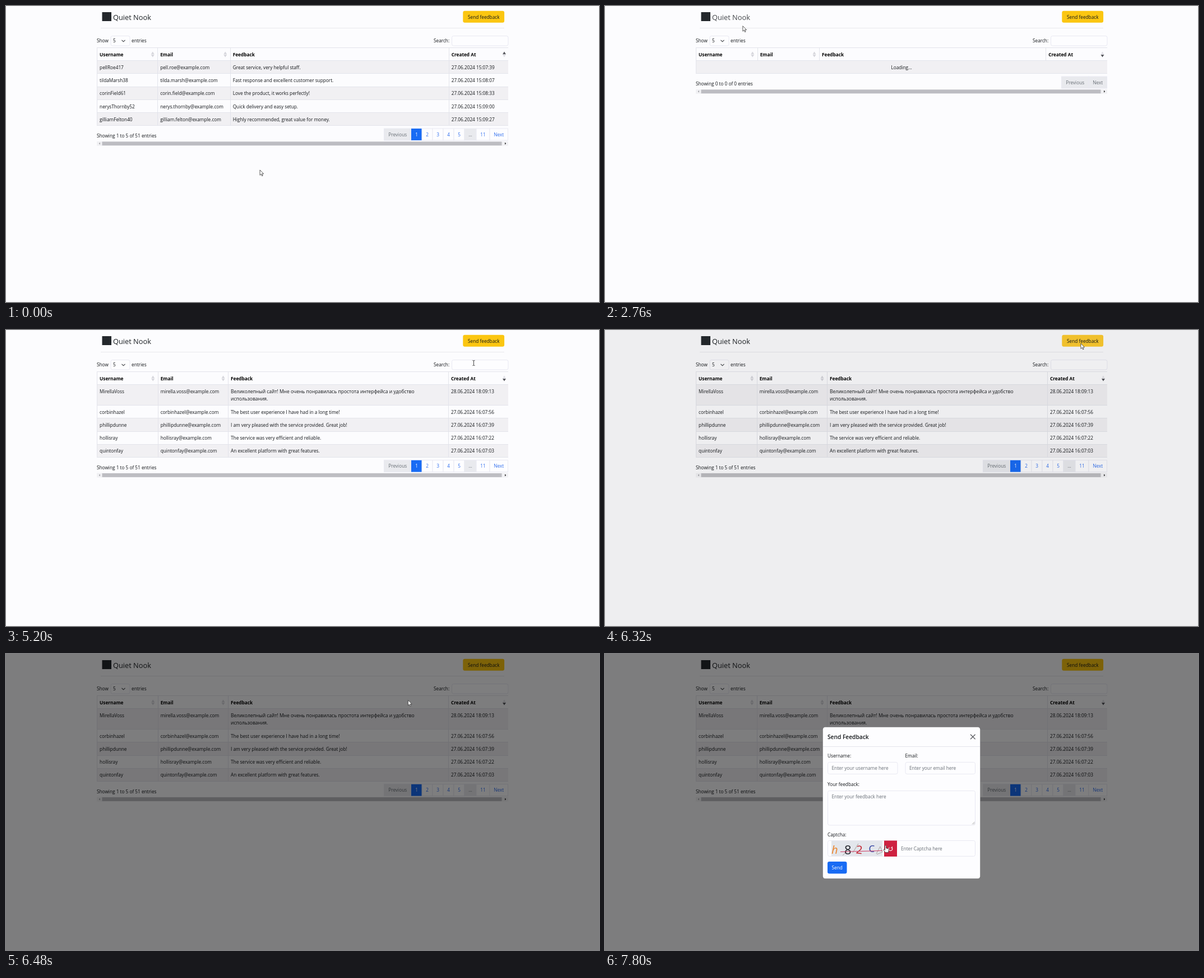
These frames come from a looping animation (1058x529 px, 8 s). An HTML page:

```html
<!DOCTYPE html>
<html lang="en">
<head>
<meta charset="utf-8">
<title>Feedback page</title>
<style>
html, body { margin: 0; width: 100%; height: 100%; overflow: hidden; background: #fcfcfe; }
svg { display: block; width: 1058px; height: 529px; }
text { font: 8.25px "Open Sans", "Noto Sans", sans-serif; fill: #14171a; }
.b { font-weight: 700; fill: #000; }
.ru { font-size: 8.5px; }
.muted { fill: #686e75; }
.link { fill: #2f6eee; }
.white { fill: #fff; }
.brand { font-size: 12.8px; }
.title { font-size: 10.2px; font-weight: 600; }
.status { font-size: 6.5px; }
.pop { font: 8px Roboto, sans-serif; }
.small { font: 7.5px Roboto, sans-serif; }
.cap { font: 20px "Noto Sans", sans-serif; }
.mid { text-anchor: middle; }
</style>
</head>
<body>
<svg id="stage" viewBox="0 0 1058 529"></svg>
<script>
const LOOP = 8000, LINE = '#e3e4eb', EDGE = '#e9e9f2', GREY = '#e9eaee', BLUE = '#186bf4';

const text = (x, y, s, cls = '', extra = '') =>
  `<text x="${x}" y="${y}" class="${cls}" ${extra}>${s}</text>`;
const rect = (x, y, w, h, fill, stroke = 'none', r = 0, extra = '') =>
  `<rect x="${x}" y="${y}" width="${w}" height="${h}" rx="${r}" fill="${fill}" stroke="${stroke}" ${extra}/>`;
const path = (d, stroke = LINE, w = 1, fill = 'none', extra = '') =>
  `<path d="${d}" stroke="${stroke}" stroke-width="${w}" fill="${fill}" ${extra}/>`;
const group = (id, body) => `<g id="${id}">${body}</g>`;
const field = (x, y, w, h) => rect(x, y, w, h, '#fdfdff', EDGE, 3);

const sortIcon = (x, up, down) =>
  path(`M${x - 3} 86.2h6l-3-4.6z`, 'none', 0, up) + path(`M${x - 3} 87h6l-3 4.6z`, 'none', 0, down);

function pager(y, loaded) {
  const items = loaded
    ? [['Previous', 674.5, 723], ...[1, 2, 3, 4, 5].map((n, i) => [n, 723 + 19 * i, 742 + 19 * i]),
       ['...', 818, 839], ['11', 839, 863], ['Next', 863, 895.5]]
    : [['Previous', 814.5, 863], ['Next', 863, 895.5]];
  return items.map(([s, a, b]) => {
    const off = !loaded || s === 'Previous' || s === '...', on = s === 1;
    return rect(a, y + 5.2, b - a, 21, on ? BLUE : off ? GREY : '#fdfdff', on ? 'none' : EDGE) +
      text((a + b) / 2, y + 18.8, s, 'mid ' + (on ? 'white' : off ? 'muted' : 'link'));
  }).join('');
}

// cols: left edges of the four columns; rows: cell texts, a feedback array wraps
function table(id, cols, rows, descending, info) {
  const loaded = rows.length > 0, heads = ['Username', 'Email', 'Feedback', 'Created At'];
  let y = 97.6, fills = '', lines = 'M162 74.4H896M162 97.6H896', cells = '';
  (loaded ? rows : [[]]).forEach((row, i) => {
    const wraps = Array.isArray(row[2]), h = wraps ? 36.9 : 23.25;
    if (i % 2 === 0) fills += rect(162, y, 734, h, '#f1f0f3');
    row.forEach((cell, c) => [].concat(cell).forEach((s, k) => {
      cells += text(cols[c] + 4.7, y + 15.2 + 13.5 * k, s, Array.isArray(cell) ? 'ru' : '');
    }));
    y += h;
    lines += `M162 ${y}H896`;
  });
  if (!loaded) cells = text(529, 112.8, 'Loading...', 'mid');
  cols.forEach((x, i) => lines += `M${x} 74.4V${loaded || !i ? y : 97.6}`);
  const x = loaded ? 889 : 887.5;
  return group(id, fills + path(lines, LINE, 1, 'none', 'shape-rendering="crispEdges"') + cells +
    heads.map((s, i) => text(cols[i] + 4.7, 89.7, s, 'b')).join('') +
    [1, 2].map(i => sortIcon(cols[i] - 8.8, '#d6d6dc', '#d6d6dc')).join('') +
    sortIcon(x, descending ? '#e0e0e6' : '#55565c', descending ? '#55565c' : '#e0e0e6') +
    text(162, y + 21.6, info) + pager(y, loaded) +
    rect(162, y + 28, 734, 8, '#f1f1f4') + rect(171.5, y + 28.6, 713, 6.8, '#bdbdc2') +
    path(`M168 ${y + 30}v4l-2.4-2z`, 'none', 0, '#a5a5aa') +
    path(`M890 ${y + 30}v4l2.4-2z`, 'none', 0, '#333'));
}

const person = (user, mail, note, time) => [user, mail + '@example.com', note, time];

const oldest = [
  person('pellRoe417', 'pell.roe', 'Great service, very helpful staff.', '27.06.2024 15:07:39'),
  person('tildaMarsh38', 'tilda.marsh', 'Fast response and excellent customer support.', '27.06.2024 15:08:07'),
  person('corinField61', 'corin.field', 'Love the product, it works perfectly!', '27.06.2024 15:08:33'),
  person('nerysThornby52', 'nerys.thornby', 'Quick delivery and easy setup.', '27.06.2024 15:09:00'),
  person('gilliamFelton40', 'gilliam.felton', 'Highly recommended, great value for money.', '27.06.2024 15:09:27')
];
const newest = [
  person('MirellaVoss', 'mirella.voss',
    ['Великолепный сайт! Мне очень понравилась простота интерфейса и удобство', 'использования.'],
    '28.06.2024 18:09:13'),
  person('corbinhazel', 'corbinhazel', 'The best user experience I have had in a long time!', '27.06.2024 16:07:56'),
  person('phillipdunne', 'phillipdunne', 'I am very pleased with the service provided. Great job!', '27.06.2024 16:07:39'),
  person('hollisray', 'hollisray', 'The service was very efficient and reliable.', '27.06.2024 16:07:22'),
  person('quintonfay', 'quintonfay', 'An excellent platform with great features.', '27.06.2024 16:07:03')
];
const total = 'Showing 1 to 5 of 51 entries';

const header =
  rect(171.5, 11, 16.5, 16, '#24282c') + text(191, 24.6, 'Quiet Nook', 'brand', 'id="brand"') +
  rect(815.3, 8.8, 73.8, 21, '#fbc611', 'none', 3.3, 'id="send"') + text(852.3, 22.6, 'Send feedback', 'mid') +
  path('M169 39.5H889', '#e8e8ec') +
  text(162, 65.2, 'Show') + field(187, 53.5, 34, 17.5) + text(191, 65.2, '5') +
  path('M206.5 60.8l3 3 3-3', '#3a3d42', 1.1) + text(224, 65.2, 'entries') +
  text(763, 65.2, 'Search:') + field(795.5, 53.5, 100.5, 17.5);

const status = rect(-1, 519, 49, 11, '#eaebef', '#cfd0d6', 1) + text(3, 527.6, '127.0.0.1:8000', 'status');

const popup =
  rect(843, -10, 214, 67, '#fff', 'none', 7, 'style="filter:drop-shadow(0 2px 4px #0004)"') +
  '<circle cx="860" cy="10.5" r="8" fill="#e04cb4"/>' +
  text(877, 13, 'Перевести страницу на русский?', 'pop') +
  path('M1040.5 1.5l5.5 5.5m0-5.5l-5.5 5.5', '#888', .8) +
  rect(903.5, 32.5, 55.5, 15.5, '#ffd60c', 'none', 4) + text(931, 43, 'Перевести', 'small mid') +
  rect(963.5, 32.5, 52.5, 15.5, '#e5e5ea', 'none', 4) + text(989.7, 43, 'Не сейчас', 'small mid') +
  rect(1020.5, 32.5, 16, 15.5, '#e5e5ea', 'none', 4) +
  path('M1028.5 37v0m0 3.3v0m0 3.3v0', '#333', 1.5, 'none', 'stroke-linecap="round"');

const captcha =
  rect(404, 334, 91, 27, '#e3e6ec') +
  path('M424 360L431 353M442 355L452 339M484 357L491 344L495 354M485 358L495 354', '#9a8f86', .8) +
  text(404, 357, 'h', 'cap', 'style="fill:#ea8630;font-style:italic"') +
  text(427, 358, '8', 'cap', 'style="fill:#2b2c33;font-size:22px"') +
  text(448, 357, '2', 'cap', 'style="fill:#c42c38" transform="rotate(6 454 350)"') +
  text(470.5, 354, 'C', 'cap', 'style="fill:#3040a0;font-size:17px"') +
  path('M420 353.5L495 351.5', '#cf3a62', 1);

const modal =
  rect(388.5, 130.5, 281, 271, '#fdfdff', '#0003', 4.4) +
  text(397, 152, 'Send Feedback', 'title') + path('M652 143.7l8.6 8.6m0-8.6l-8.6 8.6', '#5c5d63', 1.3) +
  path('M389 165.5H669') +
  text(397, 185, 'Username:') + field(397.5, 193.5, 124.5, 21) + text(404.5, 207, 'Enter your username here', 'muted') +
  text(535.5, 185, 'Email:') + field(536, 193.5, 124.5, 21) + text(543, 207, 'Enter your email here', 'muted') +
  text(397, 236, 'Your feedback:') + field(397.5, 244.5, 263, 61.5) + text(404.5, 258, 'Enter your feedback here', 'muted') +
  path('M655 304.5l4.5-4.5m-2 4.5l2-2', '#888', .7) +
  text(397, 325.5, 'Captcha:') + field(397.5, 333.5, 263, 28) + captcha +
  rect(498, 333.5, 23, 28.5, '#dc3545', 'none', 0, 'id="reload"') +
  path('M511.8 345.9A3.3 3.3 0 1 1 507.5 345.6M509.8 346.5h2.4v-2.4', '#fff', 1.1) +
  text(528, 351.3, 'Enter Captcha here', 'muted') +
  rect(397, 371, 34.5, 21.5, BLUE, 'none', 3.3) + text(414.2, 385, 'Send', 'mid white');

const cursors =
  path('M0 0V9.4L2.2 7.4 3.7 10.8 5.2 10.2 3.7 6.9H6.7Z', '#333', .8, '#fff', 'id="arrow"') +
  path('M-1.1 1.2a1.1 1.1 0 0 1 2.2 0V5l3.7.9q1.2.4 1.1 1.6l-.8 5.2h-5.2L-3.6 8.6q-.3-1.2.7-1.4L-1.1 8.4Z',
    '#333', .8, '#fff', 'id="hand"') +
  path('M-2-4.6Q0-4.6 0-3.6 0-4.6 2-4.6M0-4V4M-2 4.6Q0 4.6 0 3.6 0 4.6 2 4.6', '#333', .9, 'none', 'id="beam"');

document.getElementById('stage').innerHTML =
  rect(0, 0, 1058, 529, '#fcfcfe') + header +
  table('first', [162.4, 270.5, 400, 790], oldest, false, total) +
  table('loading', [162.4, 272, 382.3, 786.5], [], true, 'Showing 0 to 0 of 0 entries') +
  table('second', [162.4, 271, 396.3, 789.3], newest, true, total) +
  group('status', status) + group('popup', popup) +
  rect(0, 0, 1058, 529, '#000', 'none', 0, 'id="shade"') +
  group('modal', modal) + group('cursor', cursors);

const el = id => document.getElementById(id);
const show = (id, on) => el(id).style.display = on ? '' : 'none';
const ramp = (t, from, span) => Math.min(1, Math.max(0, (t - from) / span));

// time, x, y of the pointer; a fourth value gives the segment's easing
const smooth = p => p * p * (3 - 2 * p), slow = p => 1 - (1 - p) ** 2, fast = p => p ** 1.5;
const route = [
  [20, 453, 293], [860, 214, 44], [1440, 199, 22], [2200, 199, 22], [2980, 257, 39], [3880, 257, 39],
  [4680, 988, 40], [4800, 988, 40], [5200, 834.5, 59], [5640, 849, 24], [6320, 849, 24],
  [6480, 718, 82, fast], [7240, 479, 299, slow], [7640, 500.5, 342], [8000, 500.5, 342]
];

function pointer(t) {
  const i = route.findIndex(k => k[0] > t);
  if (i <= 0) return route[0].slice(1);
  const [t0, x0, y0] = route[i - 1], [t1, x1, y1, ease = smooth] = route[i];
  const p = ease((t - t0) / (t1 - t0));
  return [x0 + (x1 - x0) * p, y0 + (y1 - y0) * p];
}

function draw(t) {
  const [x, y] = pointer(t);
  const over = (a, b, c, d) => x >= a && x <= c && y >= b && y <= d;
  const open = t >= 6305, dialog = t >= 6500, offer = t >= 3080 && t < 4840;
  const onBrand = !open && over(169, 8, 262, 31);
  const onSend = !open && over(815, 9, 889, 30);
  const onReload = dialog && over(498, 333, 521, 362);
  const hand = onBrand || onSend || onReload || offer && over(903, 32, 1037, 48);
  const beam = !open && !offer && over(795, 53, 896, 71) || dialog && over(397, 244, 661, 306);

  show('first', t < 2200);
  show('loading', t >= 2200 && t < 4000);
  show('second', t >= 4000);
  show('status', onBrand && t < 2000);
  show('popup', offer);
  el('popup').style.opacity = ramp(t, 3060, 150) * (1 - ramp(t, 4760, 80));
  el('brand').style.fill = !open && over(169, 8, 262, 46) ? '#43464a' : '#1c2024';
  el('send').setAttribute('fill', onSend || open && t < 6400 ? '#fecb30' : '#fbc611');
  el('shade').style.opacity = .5 * ramp(t, 6305, 150);
  show('modal', dialog);
  el('modal').style.opacity = ramp(t, 6500, 150);
  el('modal').setAttribute('transform', `translate(0 ${-27.5 * (1 - slow(ramp(t, 6500, 300)))})`);
  el('reload').setAttribute('fill', onReload ? '#ce2140' : '#dc3545');
  el('cursor').setAttribute('transform', `translate(${x} ${y})`);
  show('hand', hand);
  show('beam', beam);
  show('arrow', !hand && !beam);
}

const start = performance.now();
function tick() {
  draw((performance.now() - start) % LOOP);
  requestAnimationFrame(tick);
}
tick();
</script>
</body>
</html>
```
